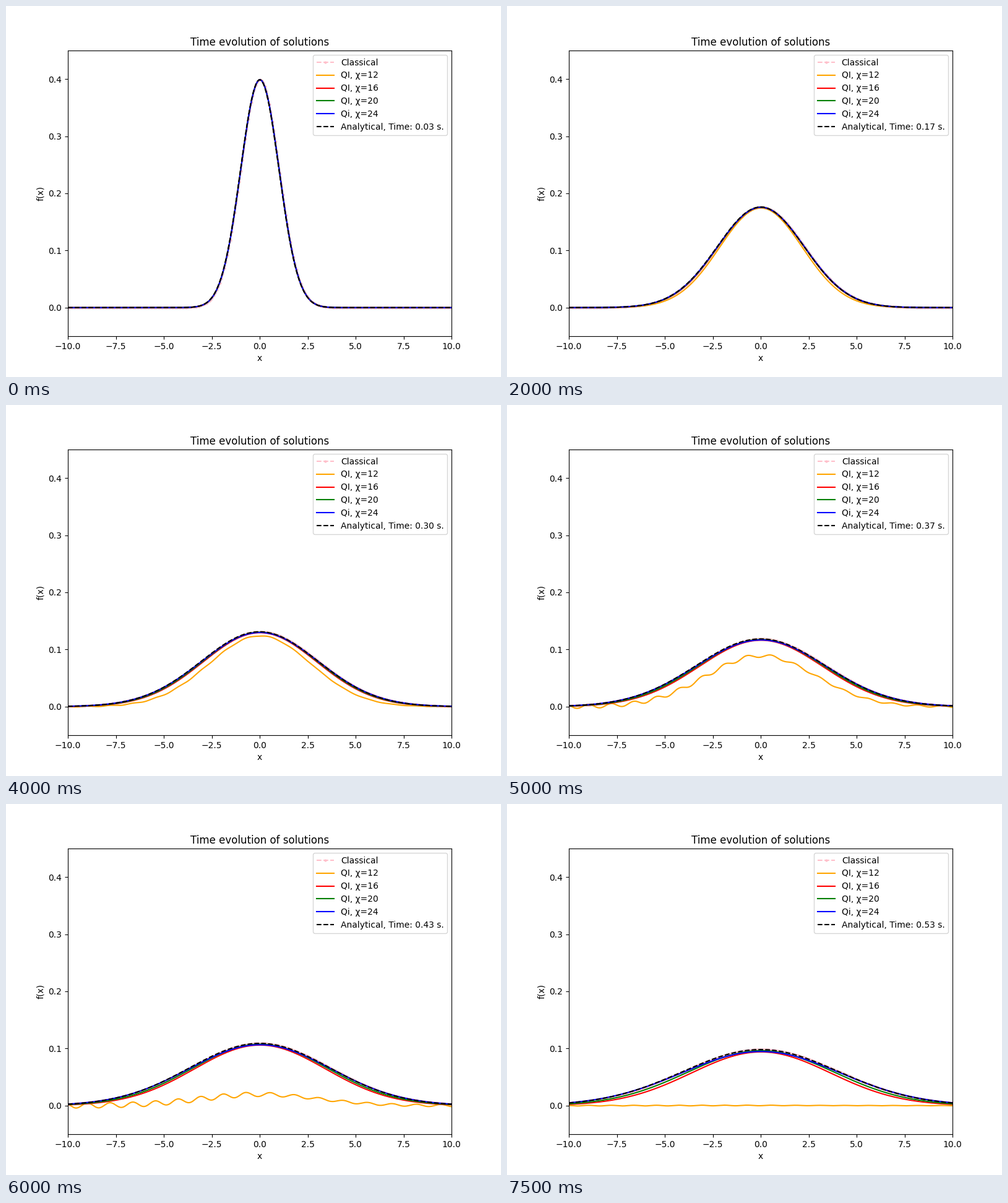
Animation, 800 px wide and 600 px high, one loop 8000 ms. Source, as a matplotlib script:

```python
import numpy as np
import matplotlib.pyplot as plt
from matplotlib.animation import FuncAnimation

FRAMES, INTERVAL = 16, 500
DRIFT = 0.015  # rightward offset of the numerical solutions

x = np.linspace(-10, 10, 256)
fine = np.linspace(-10, 10, 1024)

# label, colour, final loss of height, final loss of variance
RUNS = [
    ("QI, χ=16", "red", 0.043, 0.20),
    ("QI, χ=20", "green", 0.020, 0.11),
    ("Qi, χ=24", "blue", 0.035, -0.03),
]


def bell(u, k, peak=1.0, spread=1.0, shift=0.0):
    """Diffusing Gaussian; peak and spread are relative to the exact one."""
    v = 1 + 31 * k / 30
    height = peak / np.sqrt(2 * np.pi * v)
    return height * np.exp(-(u - shift) ** 2 / (2 * v * spread))


def lossy(k, loss, narrowing):
    """Errors grow with the square of time."""
    s = (k / (FRAMES - 1)) ** 2
    return bell(x, k, 1 - loss * s, 1 - narrowing * s, DRIFT)


def ripple(k):
    """Noise that swells and fades, strongest and shortest on the left."""
    amp = 0.0046 * np.exp(-((k - 11.4) / 2.5) ** 2)
    envelope = 0.45 + 0.55 / (1 + np.exp(fine - 1))
    u = fine + 0.72
    period = np.where(u < 0, 1.18, 1.27)
    return amp * envelope * np.cos(2 * np.pi * u / period)


def collapsing(k):
    """The coarsest run narrows early, then drops to zero."""
    s = (k / (FRAMES - 1)) ** 2
    peak = (1 - 0.14 * s) / (1 + np.exp(1.4 * (k - 11)))
    spread = 1 - 0.31 * (1 - np.exp(-(k / 6.5) ** 2))
    return bell(fine, k, peak, spread, DRIFT) + ripple(k)


def caption(k):
    return f"Analytical, Time: {(k + 1) / 30:.2f} s."


fig, ax = plt.subplots(figsize=(8, 6), dpi=100)
ax.set(xlim=(-10, 10), ylim=(-0.05, 0.45), xlabel="x", ylabel="f(x)",
       title="Time evolution of solutions")
ax.set_yticks(np.arange(5) / 10)

classical, = ax.plot(x, bell(x, 0), color="pink", ls="--", marker=".",
                     ms=4, label="Classical")
coarse, = ax.plot(fine, collapsing(0), color="orange", label="QI, χ=12")
runs = [ax.plot(x, bell(x, 0), color=color, label=label)[0]
        for label, color, _, _ in RUNS]
exact, = ax.plot(x, bell(x, 0), "k--", label=caption(0))
clock = ax.legend(loc="upper right").get_texts()[-1]


def update(k):
    classical.set_ydata(bell(x, k, shift=2 * DRIFT))
    coarse.set_ydata(collapsing(k))
    for line, (_, _, loss, narrowing) in zip(runs, RUNS):
        line.set_ydata(lossy(k, loss, narrowing))
    exact.set_ydata(bell(x, k))
    clock.set_text(caption(k))
    return [classical, coarse, *runs, exact, clock]


anim = FuncAnimation(fig, update, frames=FRAMES, interval=INTERVAL,
                     repeat=True, repeat_delay=0, blit=False)
plt.show()
```
